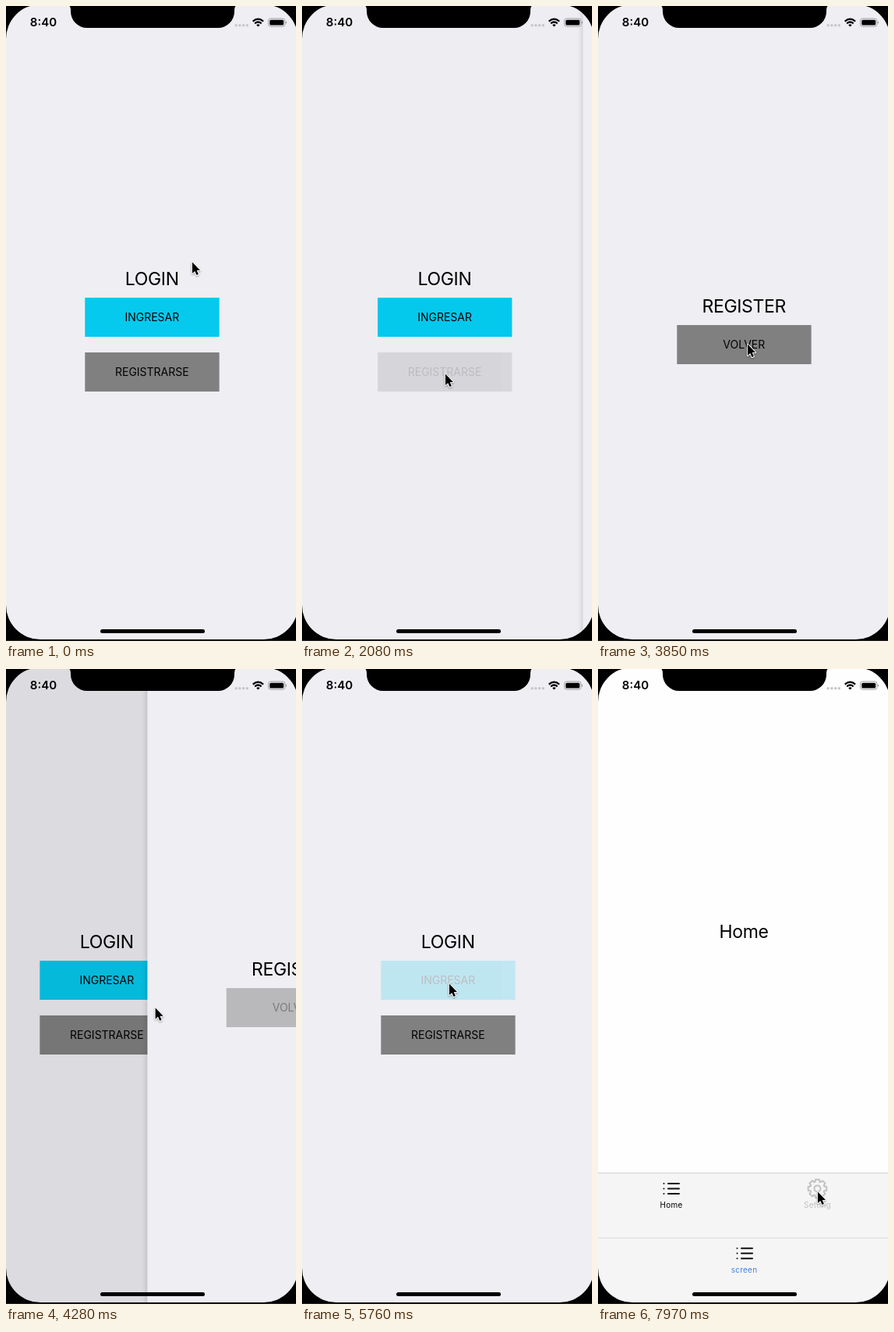
Recreate the animation shown at these times as an HTML page. Size 372 by 812 pixels, loop 8000 ms.

```html
<!DOCTYPE html>
<html lang="es">
<head>
<meta charset="utf-8">
<title>Login</title>
<style>
  html, body { margin: 0; width: 100%; height: 100%; overflow: hidden; background: #000; }
  svg { display: block; width: 372px; height: 812px; }
  text { font-family: Inter, "Open Sans", sans-serif; text-anchor: middle; }
  .title { font-size: 23px; letter-spacing: -.35px; }
  .label { font-size: 14px; }
  .tab { font-size: 10px; letter-spacing: .25px; }
  .clock { font-size: 15px; font-weight: 600; }
</style>
</head>
<body>
<svg viewBox="0 0 372 812">
  <defs>
    <linearGradient id="edge">
      <stop offset="0" stop-opacity="0"/>
      <stop offset=".5" stop-opacity=".03"/>
      <stop offset="1" stop-opacity=".11"/>
    </linearGradient>
    <filter id="soft" x="-50%" y="-50%" width="200%" height="200%">
      <feDropShadow dx="0" dy="1" stdDeviation=".8" flood-opacity=".4"/>
    </filter>
    <g id="list" fill="none" stroke="#111" stroke-width="2" stroke-linecap="round">
      <path d="M-4 -6.5H10M-4 0H10M-4 6.5H10"/>
      <path d="M-9.5 -6.5h.01M-9.5 0h.01M-9.5 6.5h.01"/>
    </g>
    <path id="arrow" d="M.9 1.6V16L4.2 12.9L6.5 18.1L8.9 17.1L6.7 12H11Z"
      stroke="#fff" stroke-width="1.8" stroke-linejoin="round" paint-order="stroke" filter="url(#soft)"/>
  </defs>

  <rect width="372" height="812"/>

  <g id="login">
    <rect width="375" height="812" fill="#eeeef3"/>
    <text class="title" x="187.2" y="357.3">LOGIN</text>
    <g id="enter">
      <rect x="101.3" y="373" width="172.3" height="50" fill="#06c9ee"/>
      <text class="label" x="187.3" y="403">INGRESAR</text>
    </g>
    <g id="join">
      <rect x="101.3" y="443" width="172.3" height="50" fill="#808080"/>
      <text class="label" x="187.3" y="473">REGISTRARSE</text>
    </g>
  </g>

  <g id="register">
    <rect x="-8" width="8" height="812" fill="url(#edge)"/>
    <rect width="375" height="812" fill="#eeeef3"/>
    <text class="title" x="187.2" y="392.3">REGISTER</text>
    <g id="back">
      <rect x="101.3" y="408" width="172.3" height="50" fill="#808080"/>
      <text class="label" x="187.3" y="438">VOLVER</text>
    </g>
  </g>

  <g id="home">
    <rect width="375" height="812" fill="#fefefe"/>
    <text class="title" x="187" y="344.3">Home</text>
    <rect y="644" width="375" height="168" fill="#f5f5f5"/>
    <rect y="644" width="375" height="1" fill="#cfcfcf"/>
    <rect y="727" width="375" height="1" fill="#dcdcdc"/>
    <use href="#list" x="94" y="664.5"/>
    <text class="tab" x="94" y="689">Home</text>
    <g transform="translate(281.4 664.4)" fill="none" stroke="#c1c1c3" stroke-width="2" stroke-linejoin="round">
      <path id="gear"/>
      <circle r="4"/>
    </g>
    <text class="tab" x="281.5" y="689" fill="#c1c1c3">Setting</text>
    <use href="#list" x="188" y="747.3"/>
    <text class="tab" x="187.5" y="772" fill="#437fe3">screen</text>
  </g>

  <!-- device frame -->
  <path fill-rule="evenodd" d="M-5 -5H380V815H-5ZM44 -2H330.6A44 44 0 0 1 374.6 42V766A44 44 0 0 1 330.6 810H44A44 44 0 0 1 0 766V42A44 44 0 0 1 44 -2Z"/>
  <rect y="811" width="372" height="1" fill="#222"/>
  <path d="M76 -2Q83 -2 83 5V7A21 21 0 0 0 104 28H272A21 21 0 0 0 293 7V5Q293 -2 300 -2Z"/>
  <rect x="121" y="797" width="134" height="5" rx="2.5"/>

  <!-- status bar -->
  <text class="clock" x="48" y="26.4">8:40</text>
  <g fill="#c6c6ca">
    <circle cx="295.2" cy="24.8" r="1.7"/><circle cx="299.9" cy="24.8" r="1.7"/>
    <circle cx="304.6" cy="24.8" r="1.7"/><circle cx="309.3" cy="24.8" r="1.7"/>
  </g>
  <g fill="none" stroke="#000" stroke-width="2.2">
    <path d="M316.7 19.6Q323.4 13.8 330.1 19.6"/>
    <path d="M319.2 22.3Q323.4 18.7 327.6 22.3"/>
  </g>
  <path d="M321.2 24.2Q323.4 22.5 325.6 24.2L323.4 26.5Z"/>
  <rect x="336.5" y="16" width="21.4" height="10.2" rx="3" fill="none" stroke="#a0a0a4"/>
  <rect x="338.2" y="17.7" width="18" height="6.8" rx="1.6"/>
  <path d="M359 19.3Q361 21.1 359 22.9Z" fill="#88888c"/>

  <use id="trail" href="#arrow" x="152" y="636"/>
  <use id="cursor" href="#arrow"/>
</svg>

<script>
const LOOP = 8000, STEP = 147.5, WIDTH = 374.6;
const el = id => document.getElementById(id);
const clamp = v => Math.min(1, Math.max(0, v));
const smooth = v => v * v * (3 - 2 * v);
const show = (id, on) => el(id).setAttribute('display', on ? 'inline' : 'none');
const fade = (id, v) => el(id).setAttribute('opacity', v);
const move = (id, x, y = 0) => el(id).setAttribute('transform', `translate(${x} ${y})`);

// start time and destination (1 = register card open)
const slides = [[2050, 1], [2800, 0], [3378, 1], [4188, 0]];

// press and release times
const presses = {
  join: [[1720, 2060], [3200, 3370]],
  back: [[2600, 2790], [3900, 4180]],
  enter: [[5480, 5800]]
};

// time, x, y of the pointer tip
const path = [
  [887, 355, 535], [1630, 183, 469], [2370, 183, 469], [2600, 189, 437],
  [2850, 189, 437], [3100, 181, 468], [3420, 181, 468], [3750, 191, 431],
  [4250, 191, 431], [4600, 176, 467], [4880, 176, 467], [5350, 188, 401],
  [6350, 188, 401], [6639, 144, 647], [6787, 110, 668], [6934, 97, 670],
  [7230, 97, 670], [7967, 281, 667]
];
const HOME_AT = 5900, HIDE_FROM = 149, HIDE_TO = 886;

function spring(ms) {
  const x = Math.max(0, ms) * .0178;
  const p = 1 - Math.exp(-x) * (1 + x);
  return p > .99 ? 1 : p;
}

function openness(t) {
  const last = slides.filter(s => s[0] <= t).pop();
  if (!last) return 0;
  const p = spring(t - last[0]);
  return last[1] ? p : 1 - p;
}

function pressOpacity(t, list) {
  let dim = 0;
  for (const [down, up] of list) {
    dim += t < up ? smooth(clamp((t - down) / 150)) : 1 - smooth(clamp((t - up) / 250));
    if (t < up) break;
  }
  return 1 - .8 * dim;
}

function pointer(t) {
  if (t < HIDE_TO) return [238, 326];
  const i = path.findIndex(k => k[0] > t);
  if (i < 0) return path[path.length - 1].slice(1);
  if (i === 0) return path[0].slice(1);
  const a = path[i - 1], b = path[i];
  const p = smooth((t - a[0]) / (b[0] - a[0]));
  return [a[1] + (b[1] - a[1]) * p, a[2] + (b[2] - a[2]) * p];
}

function gearPath() {
  const pts = [];
  for (let i = 0; i < 8; i++)
    for (const [da, r] of [[-.33, 9.2], [-.2, 12], [.2, 12], [.33, 9.2]]) {
      const a = i * Math.PI / 4 + da;
      pts.push((r * Math.cos(a)).toFixed(2) + ' ' + (r * Math.sin(a)).toFixed(2));
    }
  return 'M' + pts.join('L') + 'Z';
}

function draw(ms) {
  const t = 2 + STEP * Math.max(0, Math.floor((ms - 2) / STEP));
  const p = openness(t);
  show('register', p > 0);
  move('register', WIDTH * (1 - p));
  move('login', -.3 * WIDTH * p);
  fade('login', 1 - .15 * p);
  for (const id in presses) fade(id, pressOpacity(t, presses[id]));
  show('home', t >= HOME_AT);
  show('cursor', t < HIDE_FROM || t > HIDE_TO);
  move('cursor', ...pointer(t));
  show('trail', t > 6639 && t < 6780);
}

el('gear').setAttribute('d', gearPath());
const start = performance.now();
function tick() {
  draw((performance.now() - start) % LOOP);
  requestAnimationFrame(tick);
}
tick();
</script>
</body>
</html>
```
